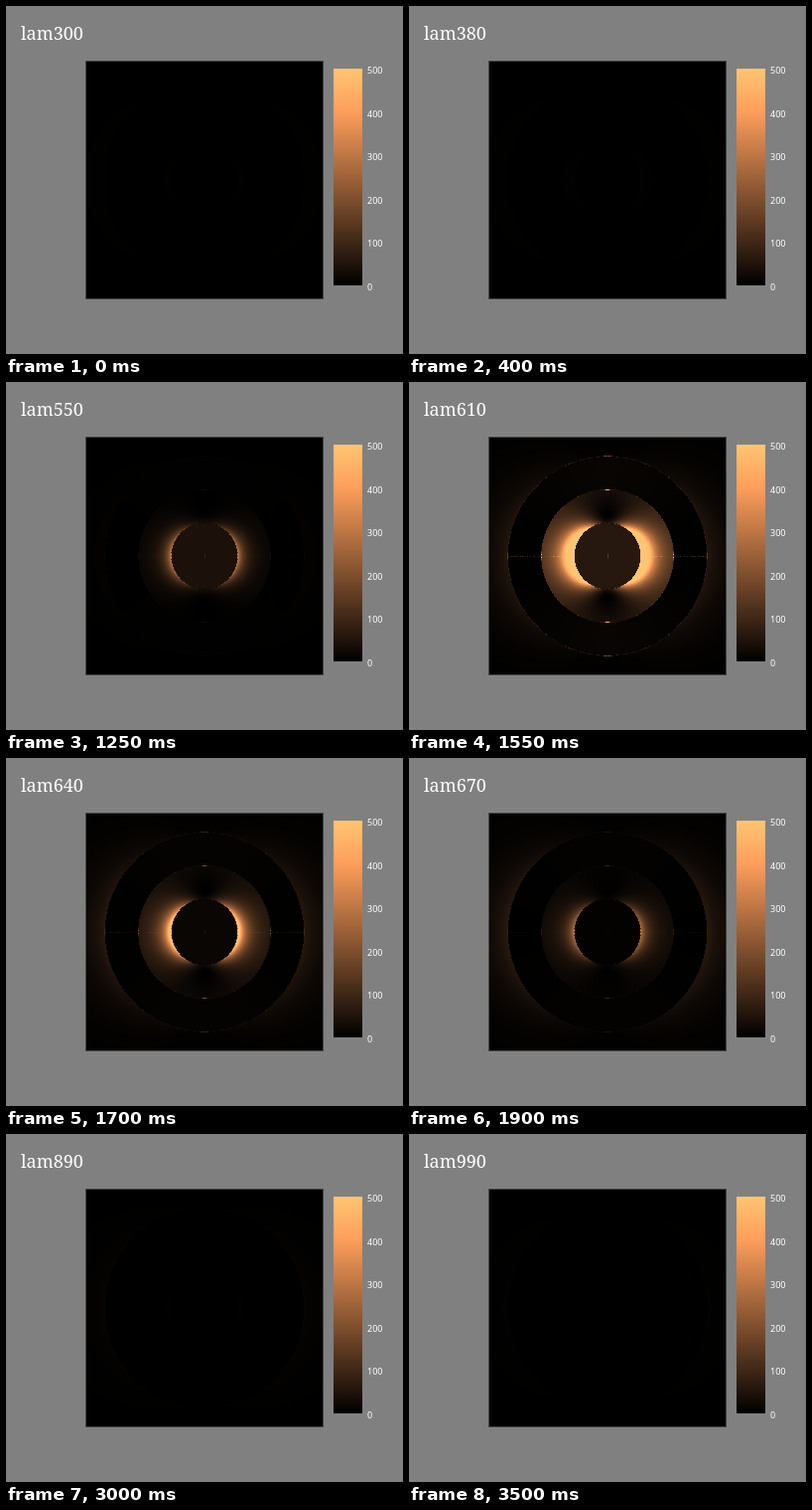
An HTML page with a canvas that plays this animation: 400 px wide and 350 px high, repeating every 3550 ms.

```html
<!DOCTYPE html>
<html>
<head>
<meta charset="utf-8">
<style>
html, body { margin: 0; width: 100%; height: 100%; overflow: hidden; background: #808080; }
canvas { display: block; }
</style>
</head>
<body>
<canvas id="stage" width="400" height="350"></canvas>
<script>
const ctx = document.getElementById('stage').getContext('2d');
const SIZE = 240, R1 = 33.3, R2 = 66.7, R3 = 100.2;
const image = ctx.createImageData(SIZE, SIZE);

// wavelength, core, gap strength, gap dipole, shell, outer strength
const keys = [
  [300, 0.5, 0.15, 2, 0.3, 0.04],
  [460, 1, 0.25, 2.5, 0.5, 0.05],
  [550, 42, 4, 4, 3, 0.08],
  [580, 68, 20, 2.8, 7, 0.3],
  [610, 60, 60, 2, 12, 0.7],
  [670, 4, 12, 2, 6, 0.8],
  [790, 1, 0.5, 2, 1, 0.25],
  [990, 0.3, 0.02, 2, 0.3, 0.06]
];

function spectrum(lam) {
  let i = 0;
  while (i < keys.length - 2 && lam > keys[i + 1][0]) i++;
  const a = keys[i], b = keys[i + 1], f = (lam - a[0]) / (b[0] - a[0]);
  return a.slice(1).map((v, n) => v * (b[n + 1] / v) ** f);
}

function copper(v) {
  const t = Math.max(0, Math.min(1, v / 500));
  return [Math.min(255, 316 * t), 197 * t, 114 * t];
}

// mirrored in both axes, like the field itself
function hash(x, y) {
  const h = Math.sin(Math.abs(x) * 12.9898 + Math.abs(y) * 78.233) * 43758.5453;
  return h - Math.floor(h);
}

// intensity of a uniform field plus a dipole
function dipole(k, s, cos2) {
  return (1 + 2 * k * s) ** 2 * cos2 + (1 - k * s) ** 2 * (1 - cos2);
}

const pixels = [];
for (let j = 0; j < SIZE; j++) {
  for (let i = 0; i < SIZE; i++) {
    const x = i - 119.5, y = j - 119.5, r = Math.hypot(x, y), cos2 = x * x / (r * r);
    const n = hash(x, y);
    // sparks on the interfaces, strongest where they cross the axes
    const spark = n ** 4 + 4 * n * (2 * cos2 - 1) ** 400;
    pixels.push({ x, y, r, cos2, n, spark });
  }
}

function drawField(lam) {
  const [core, gap, k, shell, outer] = spectrum(lam);
  pixels.forEach(({ x, y, r, cos2, n, spark }, p) => {
    let v;
    if (r < R1) v = core;
    else if (r < R2) v = gap * dipole(k, (R1 / r) ** 3, cos2);
    else if (r < R3) v = shell * (1 - 0.85 * cos2);
    else v = outer * dipole(4, (R3 / r) ** 3, cos2);

    if (Math.abs(r - R1) < 0.6) v *= 0.4 + n;
    if (Math.abs(r - R2) < 0.5 || Math.abs(r - R3) < 0.5) v += 1.5 * gap * spark;
    if (y === 0.5 && r > 45 && r < R3) v += 2 * gap * n ** 3;
    if (x === 0.5 && r < 2) v += core + 0.5 * gap;
    image.data.set([...copper(v), 255], p * 4);
  });
  ctx.putImageData(image, 80, 55);
  ctx.strokeStyle = '#404040';
  ctx.strokeRect(80.5, 55.5, 239, 239);
}

function drawScale() {
  const bar = ctx.createLinearGradient(0, 281, 0, 63);
  for (const t of [0, 0.807, 1]) bar.addColorStop(t, `rgb(${copper(t * 500)})`);
  ctx.fillStyle = bar;
  ctx.fillRect(330, 63, 29, 218);
  ctx.fillStyle = '#fff';
  ctx.font = '9px "Noto Sans", sans-serif';
  for (let v = 0; v <= 500; v += 100) ctx.fillText(v, 364, 286 - v * 0.436);
}

function draw(lam) {
  ctx.fillStyle = '#808080';
  ctx.fillRect(0, 0, 400, 350);
  drawField(lam);
  drawScale();
  ctx.font = '300 18px "Noto Serif", serif';
  ctx.fillText('lam' + lam, 15, 34);
}

let shown;
function tick() {
  const step = Math.floor(performance.now() % 3550 / 50);
  const lam = 300 + 10 * (step < 36 ? step : step - 1); // 650 holds twice as long
  if (lam !== shown) draw(shown = lam);
  requestAnimationFrame(tick);
}
tick();
</script>
</body>
</html>
```
